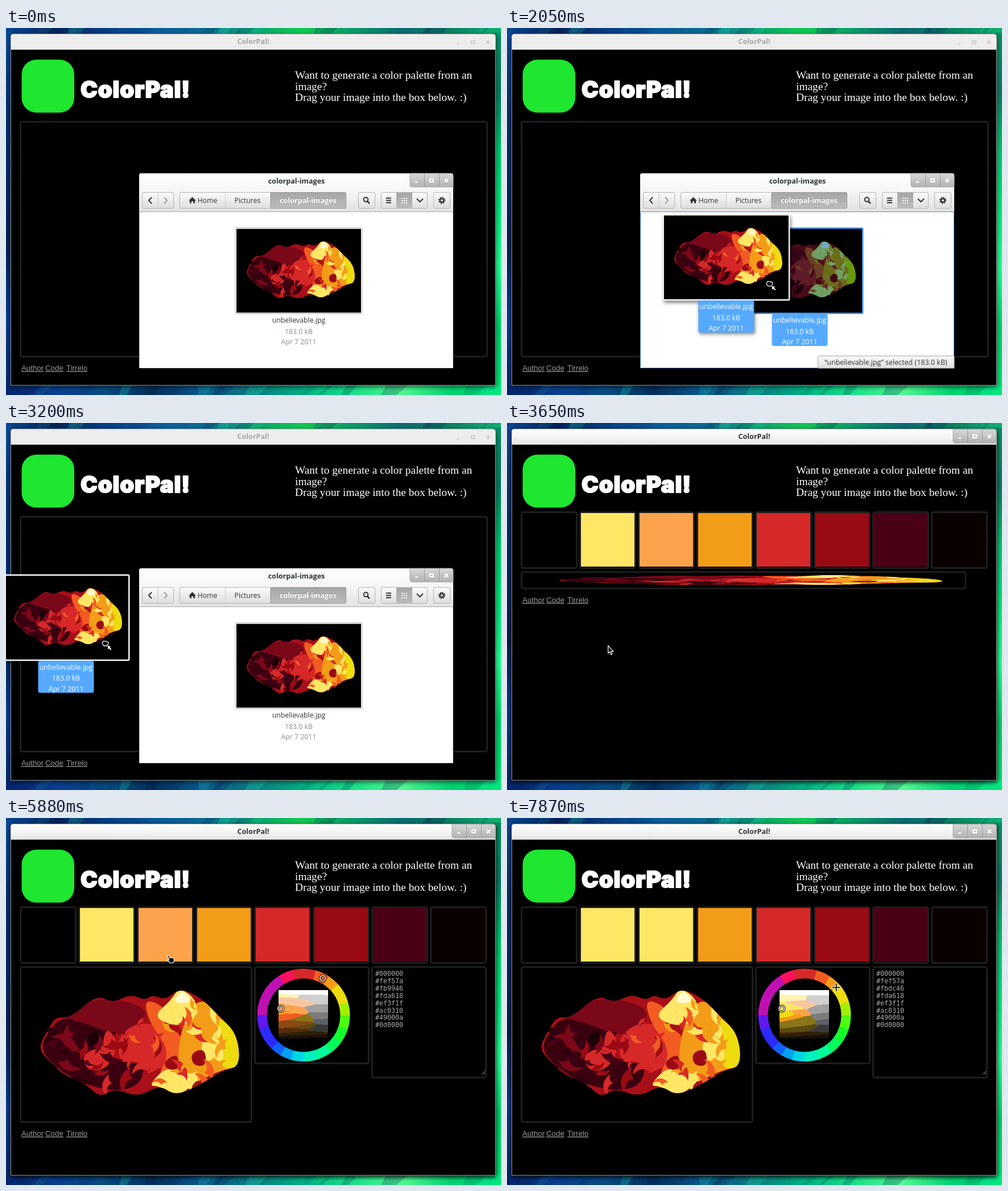
Recreate the animation shown at these times as an HTML page with a canvas. Size 870 px wide and 644 px high, loop 8 s.

```html
<!DOCTYPE html>
<html lang="en">
<head>
<meta charset="utf-8">
<title>ColorPal!</title>
<style>
html, body { margin: 0; width: 100%; height: 100%; overflow: hidden; background: #000; }
#stage { position: relative; width: 870px; height: 644px; overflow: hidden; }
#stage > * { position: absolute; left: 0; top: 0; }
#stage > canvas { left: 479px; top: 302px; }
text { white-space: pre; }
.ui { font: 12.3px 'Open Sans', sans-serif; fill: #2e3436; }
.bold { font-weight: 700; font-size: 12.6px; }
.mid { text-anchor: middle; }
.logo { font: 900 40px Inter, sans-serif; letter-spacing: .8px; fill: #fff; stroke: #fff; stroke-width: 2; stroke-linejoin: round; }
.tag { font: 19.4px 'Liberation Serif', serif; fill: #fff; }
.link { font: 13.3px 'Liberation Sans', sans-serif; fill: #999; text-decoration: underline; }
.hex { font: 11.63px 'DejaVu Sans Mono', monospace; fill: #aaa; }
</style>
</head>
<body>
<div id="stage"></div>
<script>
const LOOP = 8000;
const W = 870, H = 644;

// Spans of activity: first change, last change, number of steps
const SPANS = [
  [650, 650, 1], [1200, 1200, 1], [1430, 1430, 1], [1650, 2430, 12],
  [2520, 3200, 11], [3400, 4110, 12], [4440, 5230, 17], [5270, 5590, 9],
  [5880, 6680, 21], [6720, 7510, 18], [7570, 7670, 3], [7870, 7870, 1]
];
const DRAG = [[1650, 396, 349], [2004, 274, 327], [2430, 158, 299], [2724, 67, 283], [3200, -6, 266]];
const GRAB = [[1650, 584, 471], [2004, 462, 449], [2724, 247, 404], [3200, 175, 387]];
const MOUSE = [[4440, 177, 390], [5230, 259, 331], [5590, 283, 240], [5880, 283, 240], [6680, 557, 280]];
const HUE = [[6720, 27.5], [7510, 45], [7670, 48.5], [7870, 49.7]];

const SWATCHES = ['#000', '#ffe765', '#fca34c', '#f39c18', '#d62828', '#9a0a14', '#4a0015', '#0a0000'];
const CODES = ['#000000', '#fef57a', '#fb9946', '#fda618', '#ef3f1f', '#ac0310', '#49000a', '#0d0000'];
// Wheel segments: end angle and colour, clockwise from -14 degrees
const RING = [
  [15, '#d62828'], [33, '#f25c22'], [48, '#f39c18'], [74, '#ecdc10'], [91, '#a0f000'],
  [108, '#4cff10'], [126, '#14ff28'], [143, '#00ff5a'], [162, '#00ff96'], [180, '#00f0c0'],
  [196, '#00d4e4'], [210, '#00a0f0'], [224, '#1060ff'], [252, '#2a2aff'], [270, '#6018f0'],
  [328, '#c010b4'], [346, '#ff105f']
];

let seed = 11;
const rnd = () => (seed = seed * 16807 % 2147483647) / 2147483647;

const rect = (x, y, w, h, fill, more = '') =>
  `<rect x="${x}" y="${y}" width="${w}" height="${h}" fill="${fill}" ${more}/>`;
const frame = (x, y, w, h, id = '') =>
  rect(x + 1.5, y + 1.5, w - 3, h - 3, '#000', `stroke="#1e1e1e" stroke-width="3" rx="3" id="${id}"`);
const text = (x, y, s, cls, more = '') => `<text x="${x}" y="${y}" class="${cls}" ${more}>${s}</text>`;
const path = (d, stroke, w = 2, fill = 'none') =>
  `<path d="${d}" stroke="${stroke}" stroke-width="${w}" fill="${fill}"/>`;
const grad = (id, dir, colors) =>
  `<linearGradient id="${id}" ${dir === 'v' ? 'x2="0" y2="1"' : ''}>` +
  colors.split(' ').map((c, i, a) => `<stop offset="${i / (a.length - 1)}" stop-color="${c}"/>`).join('') +
  '</linearGradient>';

// Closed smooth curve through the midpoints of a polygon
function smooth(pts) {
  const p = pts.split(' ').map(s => s.split(',').map(Number));
  const mid = i => {
    const a = p[i % p.length], b = p[(i + 1) % p.length];
    return (a[0] + b[0]) / 2 + ',' + (a[1] + b[1]) / 2;
  };
  return 'M' + mid(0) + p.map((_, i) => `Q${p[(i + 1) % p.length]} ${mid(i + 1)}`).join('') + 'Z';
}

const OUTLINE = '56,405 72,374 88,348 112,352 160,310 188,325 218,309 245,320 258,310 280,320 ' +
  '306,298 345,317 372,346 406,378 412,436 380,443 345,466 298,488 270,468 232,490 190,474 165,491 140,466 100,450 78,428';
const PATCHES = [
  ['#3a0010', '60,405 75,375 95,350 150,350 185,345 200,375 170,400 200,430 245,430 235,470 190,480 130,465 85,435'],
  ['#7a0818', '95,350 160,312 250,330 240,370 190,380 140,360'],
  ['#d62828', '195,385 235,355 300,375 305,420 270,445 225,425 200,430'],
  ['#d62828', '130,418 165,400 190,430 150,450'],
  ['#d62828', '176,366 196,390 186,436 168,405'],
  ['#f25c22', '242,315 285,335 275,372 310,375 315,445 262,460 290,410 252,360'],
  ['#f39c18', '308,365 340,312 375,345 410,380 412,435 370,445 325,470 300,440'],
  ['#ffe765', '258,348 290,320 305,296 338,322 330,358 295,366'],
  ['#ffe765', '250,470 280,438 305,445 348,452 300,492 270,470'],
  ['#ecdc10', '368,342 408,380 416,436 375,442 386,400'],
  ['#ffe765', '340,390 372,380 388,425 350,438'],
  ['#fff8d0', '294,322 310,300 328,322 308,326'],
  ['#9a0a14', '325,412 350,404 352,436 328,434'],
  ['#9a0a14', '276,428 302,412 304,442 284,442'],
  ['#1c0008', '138,386 158,370 174,388 155,408']
];
const TONES = ['#2c000c', '#4a0015', '#7a0818', '#9a0a14', '#d62828', '#f25c22', '#f39c18', '#ffe765'];

// Small curled leaves, brighter towards the right
function leaves(n) {
  let out = '';
  for (let i = 0; i < n; i++) {
    const x = 75 + rnd() * 320, y = 325 + rnd() * 145, r = 7 + rnd() * 13;
    const k = Math.round((x - 75) / 50 + rnd() * 3 - 1.2);
    const c = TONES[Math.max(0, Math.min(7, k))];
    out += `<path transform="translate(${x} ${y}) rotate(${rnd() * 360}) scale(${r / 10})" fill="${c}"
      d="M-12,2C-8,-8 4,-9 12,-1C8,-2 4,0 3,4C-1,-2 -7,-1 -12,2Z"/>`;
  }
  return out;
}

const photo = `<g id="photo"><rect width="403" height="269"/>
  <g clip-path="url(#lamp)"><g transform="translate(-27 -263)">${rect(27, 263, 403, 269, '#a80f18')}
  ${PATCHES.map(([c, p]) => `<path d="${smooth(p)}" fill="${c}"/>`).join('')}${leaves(62)}</g></g></g>`;

const defs = `<defs>
  <clipPath id="lamp"><path transform="translate(-27 -263)" d="${smooth(OUTLINE)}"/></clipPath>
  ${grad('dt', 'h', '#0a4690 #04245c #083c80 #0a5a98 #0a6a90 #0aa070 #10c850 #0b9a68 #0b6a70 #0b8060 #0fb070')}
  ${grad('db', 'h', '#05246a #0a3d90 #064a80 #04305c #0a5a90 #0a7a80 #00b080 #18e088 #50f890 #00d070 #00e878')}
  ${grad('dl', 'v', '#0a4a9a #06306e #042a6a #052050 #0a3a90 #052a6a')}
  ${grad('dr', 'v', '#0a9064 #0a7a60 #00c86c #00e878 #20ff90 #00d068 #00e070')}
  ${grad('bar', 'v', '#ffffff #f4f4f4 #e2e2e2')}
  ${grad('btn', 'v', '#fafafa #dedede')}
  ${grad('on', 'v', '#a6a6a6 #bcbcbc')}
  ${grad('ctl', 'v', '#d8d8d8 #b2b2b2')}
  <filter id="soft" x="-20%" y="-20%" width="140%" height="140%"><feGaussianBlur stdDeviation="3"/></filter>
  ${photo}</defs>`;

function desktop() {
  let s = rect(0, 0, W, 14, 'url(#dt)') + rect(0, 620, W, 24, 'url(#db)') +
    rect(0, 8, 12, 620, 'url(#dl)') + rect(856, 8, 14, 620, 'url(#dr)');
  for (let i = 0; i < 34; i++) {
    const x = rnd() * W, w = 8 + rnd() * 40, y = i % 2 ? 0 : 626;
    s += `<path d="M${x},${y}h${w}l${-10 - rnd() * 14},18h${-w * .7}Z" fill="${i % 3 ? '#022050' : '#20e0b0'}" opacity="${.08 + rnd() * .2}"/>`;
  }
  return s;
}

// Minimise, maximise and close marks
const marks = (x, y, c) => path(`M${x - 29},${y + 3}h5`, c) +
  `<rect x="${x - 3}" y="${y - 2.5}" width="6" height="5" fill="none" stroke="${c}" stroke-width="2"/>` +
  path(`M${x + 23},${y - 3}l6,6m0,-6l-6,6`, c);

const controls = (x, y, h) => `<path d="M${x},${y}h72q4,0 4,4v${h - 4}h-72q-4,0 -4,-4Z" fill="url(#ctl)" stroke="#a4a4a4"/>` +
  path(`M${x + 25.5},${y}v${h}m26,0v${-h}`, '#9c9c9c', 1) + marks(x + 38, y + h / 2 + .5, '#fff');

const app = `<rect id="shade" x="7" y="12" width="855" height="619" rx="5" fill="#000" filter="url(#soft)"/>
  <path d="M8.5,627V15q0,-4.500 4.500,-4.500H856q4.500,0 4.500,4.500V627Z" fill="#000" stroke="#a0a0a0"/>
  <path d="M8.500,38V15q0,-4 4,-4H856q4,0 4,4V38Z" fill="#ededed"/>
  <g id="blurred">${text(434.5, 28, 'ColorPal!', 'ui bold mid', 'style="fill:#a8a8a8"')}${marks(821, 25, '#cfcfcf')}</g>
  <g id="focused"><path d="M8.500,38V15q0,-4 4,-4H856q4,0 4,4V38Z" fill="url(#bar)"/>
    ${text(434.5, 28, 'ColorPal!', 'ui bold mid')}${controls(784, 11, 24)}</g>
  ${rect(27.500, 55.500, 92.500, 93, '#1fe62f', 'rx="26"')}
  ${text(131, 122, 'ColorPal!', 'logo')}
  ${text(508, 89, 'Want to generate a color palette from an', 'tag')}
  ${text(508, 109, 'image?', 'tag')}
  ${text(508, 128, 'Drag your image into the box below. :)', 'tag')}
  <g id="drop">${frame(24, 163, 823, 415)}</g>
  <g id="palette">${SWATCHES.map((c, i) => frame(24 + 103 * i, 155, 100, 101) +
    rect(27 + 103 * i, 158, 94, 94, c, `id="sw${i}"`)).join('')}
    ${frame(24, 260, 409, 275, 'box')}<use id="pic" href="#photo"/></g>
  <g id="links">${text(27, 0, 'Author', 'link')}${text(69, 0, 'Code', 'link')}${text(106, 0, 'Tirrelo', 'link')}</g>
  <g id="tools">${frame(436, 260, 203, 172)}${frame(642, 260, 203, 197)}
    ${CODES.map((c, i) => text(649, 277 + 12.9 * i, c, 'hex', `id="code${i}"`)).join('')}
    ${path('M836,450l6,-6m-3,6l3,-3', '#999', 1)}${wheel()}</g>`;

function wheel() {
  const at = a => [523 + 73 * Math.sin(a * Math.PI / 180), 346 - 73 * Math.cos(a * Math.PI / 180)];
  let from = -14;
  return RING.map(([to, c]) => {
    const d = `M${at(from)}A73,73 0 0 1 ${at(to + .3)}`;
    from = to;
    return path(d, c, 17);
  }).join('');
}

const thumb = (edge, line, label, c1, c2) => rect(0, 0, 223, 151, edge, `rx="2" stroke="${line}"`) +
  `<use href="#photo" transform="translate(2 2) scale(${219 / 403} ${147 / 269})"/>` +
  (label ? rect(62.5, 151, 98, 56.5, label, 'rx="4"') : '') +
  ['unbelievable.jpg', '183.0 kB', 'Apr 7 2011'].map((s, i) =>
    text(111.5, [166.5, 186, 204.5][i], s, 'ui mid', `style="fill:${i ? c2 : c1}"`)).join('');

const button = (x, w, fill = 'url(#btn)') => rect(x + .5, 288.5, w - 1, 28, fill, 'rx="2.5" stroke="#b4b4b4"');
const INK = '#2e3436';
const files = `<g id="files">
  ${rect(233, 257, 555, 342, '#000', 'opacity=".35" rx="4"')}
  <path d="M234,597V259q0,-4 4,-4H782q4,0 4,4V597Z" fill="#fff"/>
  <path d="M234,323V259q0,-4 4,-4H782q4,0 4,4V323Z" fill="url(#bar)"/>
  ${path('M234,322.500H786', '#a8a8a8', 1)}${path('M234.500,322V597M785.500,322V597M234,596.500H786', '#d0d0d0', 1)}
  ${text(510.5, 273, 'colorpal-images', 'ui bold mid')}${controls(710, 255, 24)}
  ${button(239, 56)}${path('M267,289v27', '#c4c4c4', 1)}
  ${path('M256,297l-5,5.500l5,5.500', INK)}${path('M278,297l5,5.500l-5,5.500', '#a0a0a0')}
  ${button(305, 293)}${path('M385.500,289v27', '#cfcfcf', 1)}${rect(465, 288.5, 132.500, 28, 'url(#on)', 'rx="2" stroke="#999"')}
  ${path('M321,303l6.500,-6.500l6.500,6.500h-2v4.500h-3v-3.500h-3v3.500h-3v-4.500Z', 'none', 0, INK)}
  ${text(336.5, 307, 'Home', 'ui')}${text(401.5, 307, 'Pictures', 'ui')}
  ${text(531, 306, 'colorpal-images', 'ui bold mid', 'style="fill:#888"')}${text(531, 307, 'colorpal-images', 'ui bold mid', 'style="fill:#fff"')}
  ${button(619, 30)}<circle cx="632.500" cy="301" r="3.800" fill="none" stroke="${INK}" stroke-width="2"/>${path('M635,304l4,4', INK, 2.5)}
  ${button(659, 82)}${rect(686, 289, 28, 27.500, 'url(#on)')}
  ${path('M668,298.500h9m-9,4h9m-9,4h9', INK)}${path('M722,299.500l5.500,5.500l5.500,-5.500', INK)}
  <path d="M695,299h10m-10,4h10m-10,4h10" stroke="#fff" stroke-width="2" stroke-dasharray="2"/>
  ${button(751, 30)}<circle cx="766" cy="302.500" r="3.300" fill="none" stroke="${INK}" stroke-width="2.500"/>
  <circle cx="766" cy="302.500" r="5.200" fill="none" stroke="${INK}" stroke-width="2" stroke-dasharray="2.040"/>
  <g transform="translate(403 350.500)"><g id="plain">${thumb('#fff', '#b0b0b0', '', '#2e3436', '#8c8c8c')}</g>
    <g id="hover">${rect(2, 2, 219, 147, '#fff', 'opacity=".14"')}</g>
    <g id="chosen">${thumb('#4a9ff0', '#4a90d9', '#55aaff', '#fff', '#fff')}
      ${rect(2, 2, 219, 147, '#6fb0ff', 'style="mix-blend-mode:multiply"')}</g></g>
  <rect id="target" x="234.500" y="322.500" width="551" height="274" rx="2" fill="none" stroke="#4a90d9"/>
  <g id="status"><path d="M546.500,597V579q0,-3.500 3.500,-3.500H786V597Z" fill="url(#btn)" stroke="#a8a8a8"/>
    ${text(666, 591, '“unbelievable.jpg” selected (183.0 kB)', 'ui mid', 'style="font-size:12.5px"')}</g>
  </g>
  <g id="drag">${rect(2, 4, 223, 151, '#000', 'opacity=".5" filter="url(#soft)"')}
    ${rect(64, 153, 98, 57, '#000', 'opacity=".5" filter="url(#soft)"')}
    ${thumb('#fff', '#eee', '#55aaff', '#fff', '#fff')}</g>`;

const knob = id => `<g id="${id}"><circle r="5" fill="none" stroke="#000" stroke-width="3.500"/>
  <circle r="5" fill="none" stroke="#fff" stroke-width="1.600"/></g>`;
const cursors = knob('hueKnob') + knob('slKnob') + `
  <g id="grab">${path('M-3,4h6l2,-4q0,-4 -3,-3q-2,-2 -4,-1q-3,-1 -3,2q-2,2 2,6Z', '#fff', 1.3, '#000')}
    ${path('M4.500,4.500v5l1.500,-1.500l3,3l1,-1l-3,-3l1.500,-1.500Z', '#fff', 1, '#fff')}</g>
  <g id="arrow">${path('M.7,.8V14l3,-2.500l2,5l2.200,-1l-2,-4.700h4Z', '#fff', 1.200, '#000')}</g>
  <g id="hand">${path('M2,.700q1.500,-.5 2,1.300l1,3.500h5q2.500,.5 2.500,3v2l-1,3.500h-6.500l-4,-4q-1,-1.500 1,-1.500l1.500,1l-2,-7q-.2,-1.500 .5,-1.800Z', '#fff', 1.200, '#000')}</g>
  <g id="cross">${path('M-8,0H8M0,-8V8', '#fff', 4)}${path('M-7,0H7M0,-7V7', '#000', 1.800)}</g>`;

const svg = s => `<svg width="${W}" height="${H}" viewBox="0 0 ${W} ${H}">${s}</svg>`;
document.getElementById('stage').innerHTML =
  svg(defs + desktop() + app + files) + '<canvas id="sl" width="87" height="87"></canvas>' + svg(cursors);

const $ = id => document.getElementById(id);
const show = (id, on) => { $(id).style.display = on ? '' : 'none'; };
const move = (id, x, y, more = '') => $(id).setAttribute('transform', `translate(${x} ${y})${more}`);

// Saturation and lightness square, reduced to a few flat tones
const FLAT = ('ffffff fff3b0 f7c8a0 ffe765 fca34c f39c18 f25c22 ecdc10 d0d0d0 a0a0a0 7c7c7c 5a6068 ' +
  '8a7418 8a4a14 5c4a10 5a2c08 3a3a3a 2c2008 1a1008 000000').split(' ')
  .map(h => [0, 2, 4].map(i => parseInt(h.substr(i, 2), 16)));
const ctx = $('sl').getContext('2d');
let painted = -1;
function paintSquare(hue) {
  if (hue === painted) return;
  painted = hue;
  const img = ctx.createImageData(87, 87);
  for (let i = 0; i < 87 * 87; i++) {
    const s = 1 - i % 87 / 87, l = 1 - Math.floor(i / 87) / 87, a = s * Math.min(l, 1 - l);
    const [r, g, b] = [0, 8, 4].map(n => {
      const k = (n + hue / 30) % 12;
      return 255 * (l - a * Math.max(-1, Math.min(k - 3, 9 - k, 1)));
    });
    let best, low = Infinity;
    for (const c of FLAT) {
      const d = (c[0] - r) ** 2 + (c[1] - g) ** 2 + (c[2] - b) ** 2;
      if (d < low) { low = d; best = c; }
    }
    img.data.set([...best, 255], i * 4);
  }
  ctx.putImageData(img, 0, 0);
}

function snap(t) {
  let out = 0;
  for (const [a, b, n] of SPANS) {
    if (t < a) break;
    const d = (b - a) / (n - 1) || 1;
    out = a + Math.min(n - 1, Math.floor((t - a) / d + .2)) * d;
  }
  return out;
}

function along(keys, t) {
  if (t <= keys[0][0]) return keys[0].slice(1);
  for (let i = 1; i < keys.length; i++) {
    const a = keys[i - 1], b = keys[i];
    if (t < b[0]) return a.slice(1).map((v, j) => v + (b[j + 1] - v) * (t - a[0]) / (b[0] - a[0]));
  }
  return keys[keys.length - 1].slice(1);
}

function draw(now) {
  const t = snap(now);
  const dropped = t >= 3400, ready = t >= 3520, picked = t >= 5880;
  const dragging = t >= 1650 && !dropped;
  const chosen = t >= 1200 && t < 2520;
  const [gx, gy] = along(GRAB, t);

  show('blurred', !dropped);
  show('focused', dropped);
  $('shade').setAttribute('opacity', dropped ? .8 : .5);
  show('files', !dropped);
  show('hover', t >= 650 && t < 1200);
  show('plain', !chosen);
  show('chosen', chosen);
  show('status', t >= 1430 && t < 2520);
  show('target', dragging && gx > 234);
  show('drag', dragging);
  show('grab', dragging);
  move('drag', ...along(DRAG, t));
  move('grab', gx, gy);

  const p = .5 - Math.cos(Math.PI * Math.max(0, Math.min(1, (t - 3545) / 565))) / 2;
  const w = 823 - 414 * p, h = 6 + 269 * p;
  show('drop', !ready);
  show('palette', ready);
  $('box').setAttribute('width', w - 3);
  $('box').setAttribute('height', h - 3);
  move('pic', 27, 263, ` scale(${(w - 6) / 403} ${Math.max(.001, (h - 6) / 269)})`);
  move('links', 0, ready ? 283 + h : 601);

  const [hue] = along(HUE, t), turn = hue * Math.PI / 180;
  const kx = 523 + 73 * Math.sin(turn), ky = 346 - 73 * Math.cos(turn);
  for (const id of ['tools', 'sl', 'slKnob']) show(id, picked);
  show('hueKnob', picked && t < 6720);
  move('hueKnob', kx, ky);
  move('slKnob', 483, 334.5);
  if (picked) paintSquare(hue);
  const g = Math.round(70 + 181 * hue / 60).toString(16);
  $('code2').textContent = `#fb${g}46`;
  $('sw2').setAttribute('fill', hue > 38 ? '#ffe765' : '#fca34c');

  const [mx, my] = t >= 6720 ? [kx, ky - 1.5] : along(MOUSE, t);
  const cross = mx > 440, hand = !cross && my < 255;
  show('cross', dropped && cross);
  show('hand', dropped && hand);
  show('arrow', dropped && !cross && !hand);
  for (const id of ['cross', 'hand', 'arrow']) move(id, mx, my);
}

const start = performance.now();
function tick() {
  draw((performance.now() - start) % LOOP);
  requestAnimationFrame(tick);
}
tick();
</script>
</body>
</html>
```
